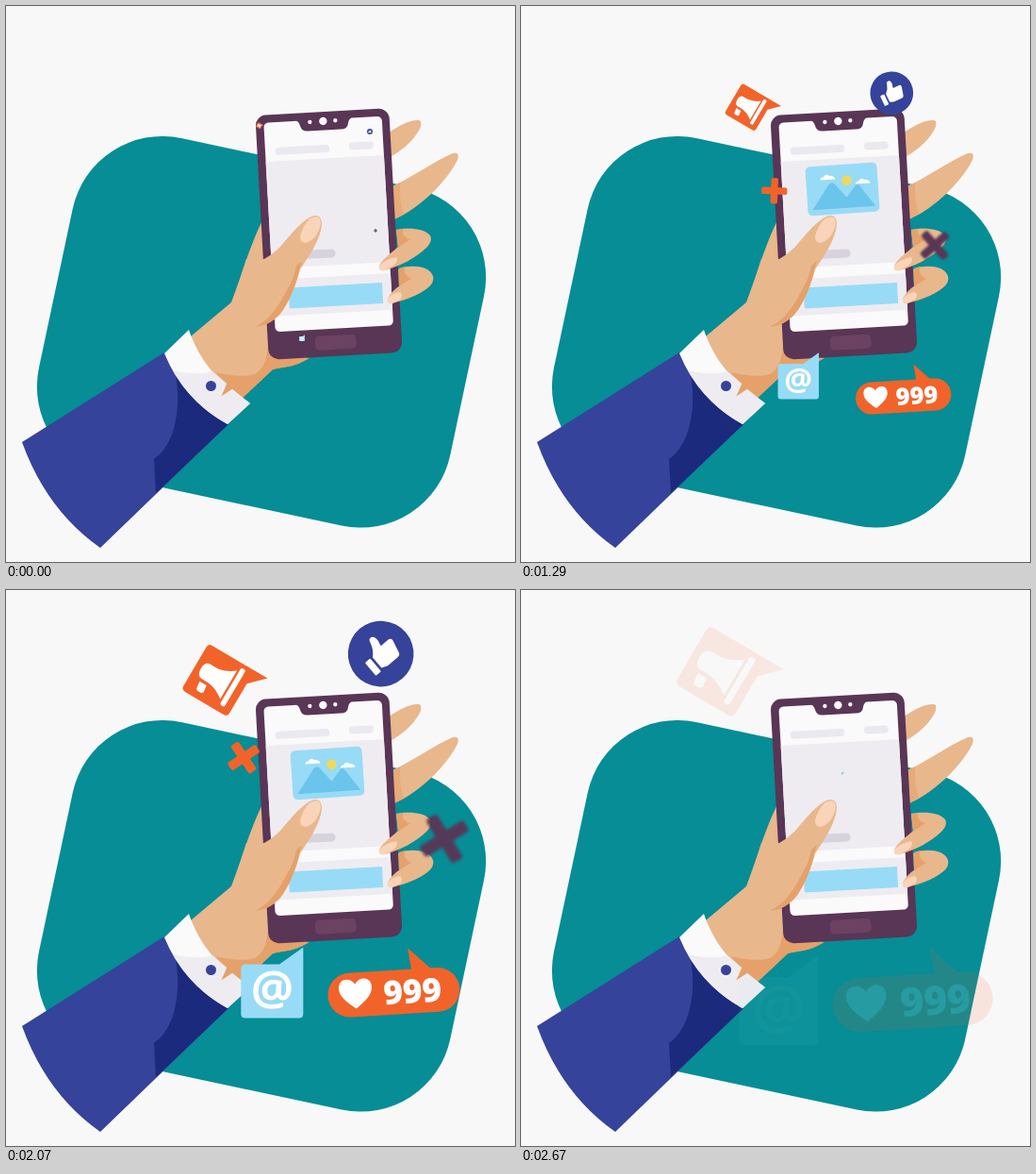
These frames come from a looping animation (540x589 px, 2700 ms). An HTML page:

```html
<!DOCTYPE html>
<html lang="en">
<head>
<meta charset="utf-8">
<title>Phone in hand</title>
<style>
  html, body { margin: 0; width: 100%; height: 100%; overflow: hidden; background: #f8f8f8; }
  svg { display: block; width: 540px; height: 589px; }
  text { font-family: "Open Sans", "Noto Sans", sans-serif; font-weight: 800; fill: #fff; text-anchor: middle; }
  .skin { fill: #e9b78c; }
  .shade { fill: #e5a169; }
  .nail { fill: #fad4b8; }
  .navy { fill: #35439a; }
  .orange { fill: #f2632a; }
  .sky { fill: #98dbf7; }
  .plum { fill: #593556; }
  .white { fill: #fafafa; }
  .mist { fill: #eeecf1; }
  #dark { filter: blur(1px); }
</style>
</head>
<body>
<svg viewBox="0 0 540 589">
  <rect x="-223" y="-183" width="446" height="366" rx="97" fill="#068d95" transform="translate(271 345.3) rotate(12)"/>

  <!-- hand behind the phone -->
  <path class="skin" d="M405 135C417 126 430 120 438 121Q443 122 438 132C431 144 420 153 406 161Z"/>
  <path class="skin" d="M408 192C430 182 455 164 474 156Q482 154 479 163C469 184 440 214 412 226Z"/>
  <path d="M408 192L418 187Q417 207 422 220L412 226Z" fill="#e5a169" opacity=".55"/>
  <path class="skin" d="M196 350L239 314C250 285 258 256 272 227L300 250V366L320 373C306 383 294 382 283 385L251 415L229 413L190 375Z"/>
  <path class="shade" d="M222 388C238 392 255 393 264 390C273 385 277 374 278 360L290 368L322 373C306 383 294 382 283 385L251 415L228 414L234 400Z"/>

  <!-- phone -->
  <g transform="translate(342.5 241.5) rotate(-3.2)">
    <rect class="plum" x="-71" y="-129.5" width="142" height="259" rx="11"/>
    <rect class="white" x="-62.5" y="-121.5" width="125.5" height="222" rx="5"/>
    <path class="plum" d="M-30 -123Q-25 -121 -24 -116Q-23 -110 -16 -110H19Q26 -110 27 -116Q28 -121 33 -123Z"/>
    <g class="white">
      <circle cx="-13.500" cy="-119.500" r="2.200"/>
      <circle cx=".5" cy="-119.700" r="4.200"/>
      <circle cx="13.500" cy="-119.700" r="2.200"/>
    </g>
    <rect class="mist" x="-62.5" y="-80" width="125.5" height="113"/>
    <rect class="mist" x="-62.5" y="45" width="125.5" height="39"/>
    <rect x="-52" y="-94.500" width="58" height="8" rx="4" fill="#ebe8ef"/>
    <rect x="26.500" y="-95.500" width="26" height="8" rx="4" fill="#ebe8ef"/>
    <rect x="-34" y="16" width="40" height="9" rx="4.500" fill="#d6d3dd"/>
    <rect class="sky" x="-46" y="54.500" width="99.500" height="22"/>
    <rect x="-21" y="107.500" width="43.500" height="15" rx="4.500" fill="#6c4263"/>
  </g>

  <g id="card">
    <rect class="sky" x="-38" y="-26" width="76" height="52" rx="5"/>
    <circle cx="5" cy="-9" r="5.300" fill="#f0d95a"/>
    <path d="M-33 20L-14 -6Q-11 -9 -8 -6L4 9L14 -3Q16 -5 18 -3L34 20Z" fill="#6ac4ec"/>
    <g id="cloud" fill="#fff"><path d="M-23 -11Q-22 -14 -19 -14Q-17 -18 -13 -15Q-8 -15 -7 -11Z"/></g>
    <use href="#cloud" x="37" y="6.500"/>
  </g>

  <!-- thumb and front fingers -->
  <path class="skin" d="M255 268L274 268Q283 263 290 256C300 245 310 231 322 224Q333 218 335 229C335 245 323 263 312 279C306 302 297 322 283 333Q274 339 264 340L236 330Z"/>
  <path class="shade" d="M314 270C308 291 306 303 294 322Q283 338 264 340C281 332 291 315 299 299Q306 288 308 275Z"/>
  <path class="nail" d="M323 225Q333 220 334 229C333 241 325 250 317 251Q309 249 314 238Q317 230 323 225Z"/>
  <path class="skin" d="M414 237C427 234 445 236 450 243Q453 249 446 256C435 267 417 276 402 280Q395 281 396 275C400 267 410 261 416 255Z"/>
  <path class="shade" d="M414 238L421 236Q419 245 429 247L416 256Z"/>
  <path class="nail" d="M414 266Q417 270 411 275L402 280Q395 281 396 275Q403 268 414 266Z"/>
  <path class="skin" d="M417 278C430 274 449 275 453 286Q455 293 447 299C435 308 421 312 410 315Q404 316 405 310Q409 302 418 296Z"/>
  <path class="shade" d="M416 279L423 276Q421 285 430 289L417 297Z"/>
  <path class="nail" d="M418 303Q422 306 418 311L410 315Q404 316 405 310Q410 304 418 303Z"/>

  <!-- sleeve and cuff -->
  <path class="navy" d="M17 462L168 367Q192 412 236 443L100 574Q43 534 17 462Z"/>
  <path d="M180 390Q186 425 176 454Q169 472 157 480L159 516L236 443Q202 424 180 390Z" fill="#1b2a7c"/>
  <path class="white" d="M194 343C201 364 215 388 234 400L228 414L240 406L259 421L235 443Q188 417 168 368Z"/>
  <path class="mist" d="M177 386Q203 392 219 387L234 400L228 414L240 406L259 421L235 443Q198 423 177 386Z"/>
  <circle class="navy" cx="217.500" cy="402.500" r="5.500"/>

  <!-- floating icons -->
  <g id="horn">
    <path class="orange" d="M-72 0H0L-17 17V55Q-17 60 -22 60H-72Q-77 60 -77 55V5Q-77 0 -72 0Z"/>
    <g transform="translate(-77 0)" fill="#fff">
      <path d="M13 19H22Q33 18 43 10V47Q33 39 22 38H13Q7 37 7 28.500Q7 20 13 19Z"/>
      <rect x="45.500" y="4.500" width="6" height="48" rx="2.500"/>
      <path d="M13 41.500H22L23 49Q23 52 20 52H17Q14 52 14 49Z"/>
    </g>
  </g>
  <g id="like">
    <circle class="navy" r="38.500"/>
    <g fill="#fff">
      <rect x="-21" y="-4" width="8" height="20" rx="1.500"/>
      <path d="M-10 -3Q-3 -9 -1 -18Q0 -23 4 -22Q8 -21 7.500 -14L6 -7H17Q21 -7 21 -3L17 13Q16 16 12 16H-3L-10 13Z"/>
    </g>
  </g>
  <g id="mail">
    <path class="sky" d="M0 0V78Q0 83 -5 83H-68Q-73 83 -73 78V25Q-73 20 -68 20H-28Z"/>
    <text x="-36.500" y="68" font-size="56" style="font-weight:700">@</text>
  </g>
  <g id="badge">
    <rect class="orange" x="-95" y="24.500" width="152" height="51" rx="25.500"/>
    <path class="orange" d="M0 0L25 25V30H3.500Z"/>
    <path d="M-63 66C-74 58 -82 51 -82 42C-82 30 -68 29 -63 38C-58 29 -44 30 -44 42C-44 51 -52 58 -63 66Z" fill="#fff"/>
    <text x="2.500" y="63.500" font-size="38">999</text>
  </g>
  <g id="plus" class="orange">
    <rect x="-20" y="-5.500" width="40" height="11" rx="2.500"/>
    <rect x="-5.500" y="-20" width="11" height="40" rx="2.500"/>
  </g>
  <g id="dark" class="plum">
    <rect x="-20" y="-5" width="40" height="10" rx="2.500"/>
    <rect x="-5" y="-20" width="10" height="40" rx="2.500"/>
  </g>
</svg>
<script>
const LOOP = 2700, STEP = 30;
const clamp = v => Math.max(0, Math.min(1, v));
const ramp = (t, from, to) => clamp((t - from) / (to - from));

function pose(id, x, y, angle, scale, opacity = 1) {
  const el = document.getElementById(id);
  el.setAttribute("transform", `translate(${x} ${y}) rotate(${angle}) scale(${scale})`);
  el.setAttribute("opacity", opacity);
}

// Piecewise linear track: rows of [time, ...values]
function track(rows, t) {
  let i = 1;
  while (i < rows.length - 1 && t > rows[i][0]) i++;
  const a = rows[i - 1], b = rows[i], p = (t - a[0]) / (b[0] - a[0]);
  return a.slice(1).map((v, k) => v + (b[k + 1] - v) * p);
}

const DARK = [
  [0, 392, 238, 0], [390, 407, 242.5, -42], [900, 425.5, 249, -95],
  [1290, 439, 253.5, -132], [1800, 456, 260, -193], [2310, 473, 266.5, -228]
];

function draw(t) {
  const enter = ramp(t, 0, 1030), leave = ramp(t, 2194, 2690);
  const size = (1 - Math.pow(1 - enter, 1.75)) * (1 - leave);
  pose("card", 341, 194, -3.8 - 720 * (1 - enter) + 720 * leave, size);

  pose("horn", 273.8 + .0018 * t, 126.5 - .0159 * t, 30.5, (7 + .0309 * t) / 75, 1 - ramp(t, 2390, 2705));
  pose("like", 386 + .00563 * t, 133 - .0316 * t, -.0195 * t, (3 + .01537 * t) / 38.5, 1 - ramp(t, 2200, 2600));
  pose("mail", 317 - .0008 * t, 348.3 + .0146 * t, 0, (6 + .029 * t) / 73, 1 - ramp(t, 2285, 2690));

  const show = ramp(t, 0, 150);
  pose("badge", 400.2 + .0125 * t, 379.8 - .0003 * t, -3.5, .247 + .000326 * t, show * (1 - ramp(t, 2390, 2710)));
  pose("plus", 296.3 - .02135 * t, 226 - .0234 * t, 63 - .0469 * t, (6.5 + .0055 * t) / 20, show * (1 - ramp(t, 2300, 2600)));

  const [x, y, angle] = track(DARK, t);
  pose("dark", x, y, angle, (2 + .0122 * t) / 20, 1 - ramp(t, 2050, 2470));
}

function tick(now) {
  draw(Math.floor(now % LOOP / STEP) * STEP);
  requestAnimationFrame(tick);
}
draw(0);
requestAnimationFrame(tick);
</script>
</body>
</html>
```
